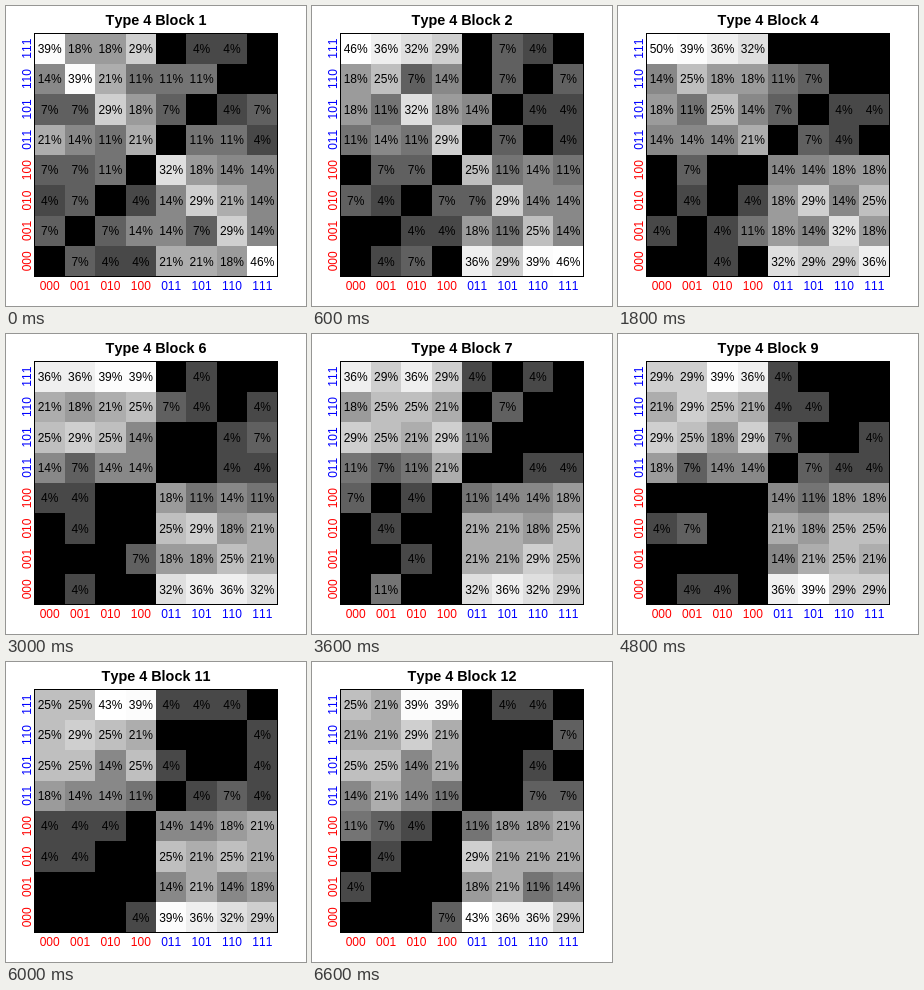
Write an HTML page that moves like this. It is 300 by 300 pixels and loops after 9 s.

```html
<!DOCTYPE html>
<html lang="en">
<head>
<meta charset="utf-8">
<title>Type 4 confusion matrix</title>
<style>
  html, body { margin: 0; width: 100%; height: 100%; overflow: hidden; background: #fff; }
  svg { display: block; width: 100vw; height: 100vh; }
  text {
    font: 12px "Liberation Sans", Arial, sans-serif;
    font-kerning: none;
    text-anchor: middle;
  }
  .title { font-size: 14.4px; font-weight: bold; }
  .cells rect { shape-rendering: crispEdges; }
  .frame { fill: none; stroke: #000; }
</style>
</head>
<body>
<svg id="chart" viewBox="0 0 300 300"></svg>
<script>
const LEFT = 28.5, TOP = 27.5, SIZE = 243, CELL = SIZE / 8;
const STEP = 600, LOOP = 9000, BLOCKS = 12, TRIALS = 28;
const ITEMS = ["000", "001", "010", "100", "011", "101", "110", "111"];
// Grey level for 0, 1, 2, ... responses out of 28.
const SHADES = [0, 72, 96, 116, 136, 155, 173, 191, 207, 223, 239, 252, 255];

// Response percentages per block, top row first.
const measured = {
  1: `39 18 18 29  0  4  4  0
      14 39 21 11 11 11  0  0
       7  7 29 18  7  0  4  7
      21 14 11 21  0 11 11  4
       7  7 11  0 32 18 14 14
       4  7  0  4 14 29 21 14
       7  0  7 14 14  7 29 14
       0  7  4  4 21 21 18 46`,
  2: `46 36 32 29  0  7  4  0
      18 25  7 14  0  7  0  7
      18 11 32 18 14  0  4  4
      11 14 11 29  0  7  0  4
       0  7  7  0 25 11 14 11
       7  4  0  7  7 29 14 14
       0  0  4  4 18 11 25 14
       0  4  7  0 36 29 39 46`,
  4: `50 39 36 32  0  0  0  0
      14 25 18 18 11  7  0  0
      18 11 25 14  7  0  4  4
      14 14 14 21  0  7  4  0
       0  7  0  0 14 14 18 18
       0  4  0  4 18 29 14 25
       4  0  4 11 18 14 32 18
       0  0  4  0 32 29 29 36`,
  6: `36 36 39 39  0  4  0  0
      21 18 21 25  7  4  0  4
      25 29 25 14  0  0  4  7
      14  7 14 14  0  0  4  4
       4  4  0  0 18 11 14 11
       0  4  0  0 25 29 18 21
       0  0  0  7 18 18 25 21
       0  4  0  0 32 36 36 32`,
  7: `36 29 36 29  4  0  4  0
      18 25 25 21  0  7  0  0
      29 25 21 29 11  0  0  0
      11  7 11 21  0  0  4  4
       7  0  4  0 11 14 14 18
       0  4  0  0 21 21 18 25
       0  0  4  0 21 21 29 25
       0 11  0  0 32 36 32 29`,
  10: `25 29 43 39  4  0  0  0
       25 32 21 21  4  4  0  0
       29 25 18 29  7  0  0  7
       18  7 14 11  0  7  4  0
        0  0  0  0 14 11 18 18
        4  7  0  0 21 18 29 25
        0  0  0  0 14 21 21 21
        0  0  4  0 36 39 29 29`,
  12: `25 21 39 39  0  4  4  0
       21 21 29 21  0  0  0  7
       25 25 14 21  0  0  4  0
       14 21 14 11  0  0  7  7
       11  7  4  0 11 18 18 21
        0  4  0  0 29 21 21 21
        4  0  0  0 18 21 11 14
        0  0  0  7 43 36 36 29`
};

const known = Object.keys(measured).map(Number);
const toCounts = table =>
  table.trim().split(/\s+/).map(p => Math.round(p * TRIALS / 100));

// Blend two blocks; rounding running sums keeps each column total whole.
function blend(a, b, k) {
  const out = [];
  for (let col = 0; col < 8; col++) {
    let sum = 0, used = 0;
    for (let i = col; i < 64; i += 8) {
      sum += a[i] + (b[i] - a[i]) * k;
      out[i] = Math.round(sum) - used;
      used += out[i];
    }
  }
  return out;
}

function countsFor(block) {
  if (measured[block]) return toCounts(measured[block]);
  const next = known.find(n => n > block);
  const prev = known[known.indexOf(next) - 1];
  return blend(toCounts(measured[prev]), toCounts(measured[next]),
    (block - prev) / (next - prev));
}

const chart = document.getElementById("chart");

function add(parent, tag, attrs, text) {
  const el = document.createElementNS("http://www.w3.org/2000/svg", tag);
  for (const key in attrs) el.setAttribute(key, attrs[key]);
  if (text) el.textContent = text;
  parent.appendChild(el);
  return el;
}

function drawBlock(block) {
  const group = add(chart, "g", { class: "cells", visibility: "hidden" });
  add(group, "text", { class: "title", x: 150, y: 19 }, `Type 4 Block ${block}`);
  countsFor(block).forEach((count, i) => {
    const x = LEFT + i % 8 * CELL, y = TOP + Math.floor(i / 8) * CELL;
    const v = SHADES[Math.min(count, SHADES.length - 1)];
    add(group, "rect", { x, y, width: CELL, height: CELL, fill: `rgb(${v},${v},${v})` });
    if (count) {
      add(group, "text", { x: x + CELL / 2, y: y + CELL / 2 + 4.3 },
        `${Math.round(count / TRIALS * 100)}%`);
    }
  });
  return group;
}

const groups = Array.from({ length: BLOCKS }, (_, i) => drawBlock(i + 1));

add(chart, "rect", { class: "frame", x: LEFT, y: TOP, width: SIZE, height: SIZE });
ITEMS.forEach((item, i) => {
  const fill = i < 4 ? "#f00" : "#00f";
  const offset = (i + 0.5) * CELL;
  add(chart, "text", { x: LEFT + offset, y: 284, fill }, item);
  const place = `translate(25 ${TOP + SIZE - offset}) rotate(-90)`;
  add(chart, "text", { transform: place, fill }, item);
});

let shown = -1;
const start = performance.now();

function tick() {
  const time = (performance.now() - start) % LOOP;
  const index = Math.min(BLOCKS - 1, Math.floor(time / STEP));
  if (index !== shown) {
    groups.forEach((g, i) => g.setAttribute("visibility", i === index ? "visible" : "hidden"));
    shown = index;
  }
  requestAnimationFrame(tick);
}
tick();
</script>
</body>
</html>
```
